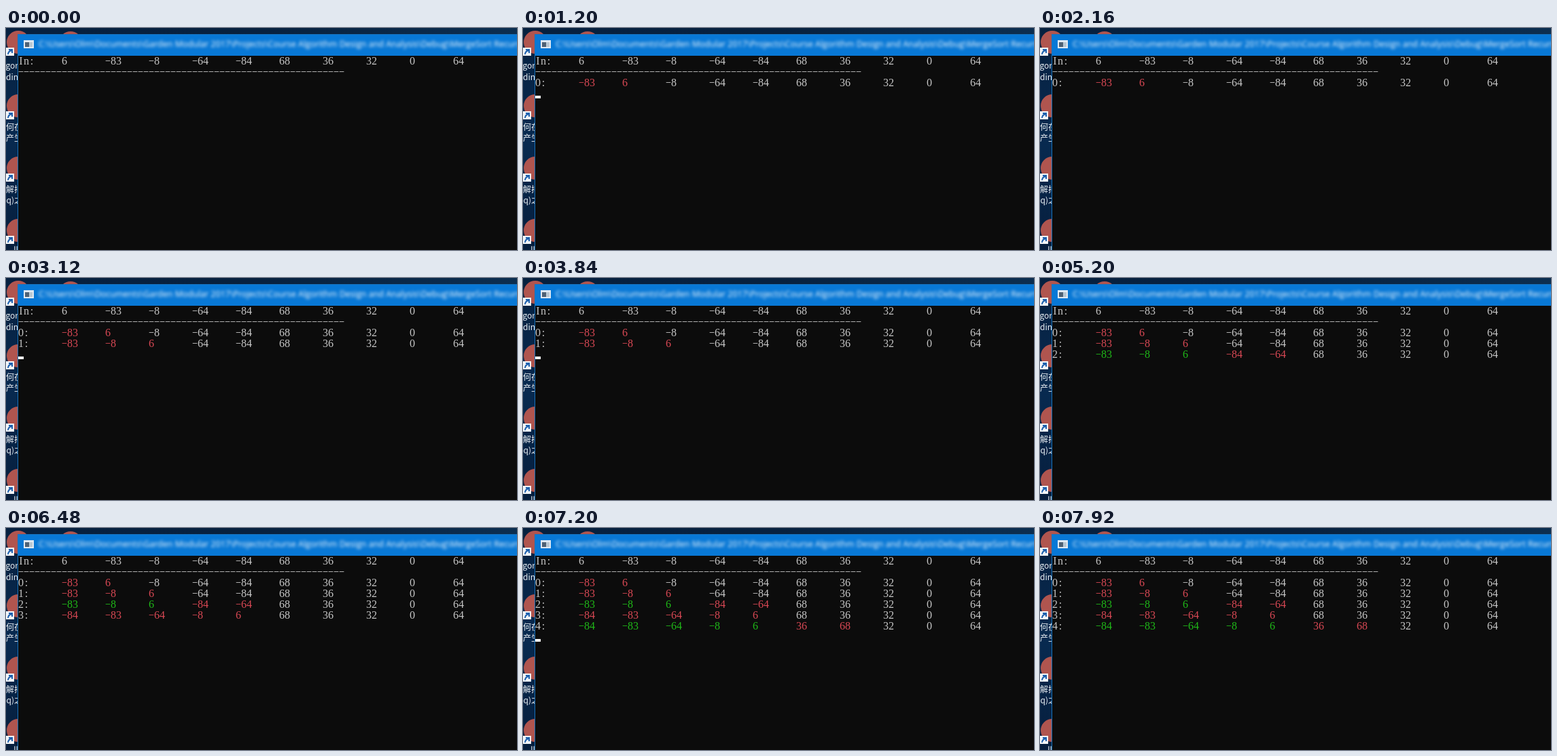
An HTML page with a canvas for the animation above (8000 ms loop, 752 px wide and 328 px high).

```html
<!DOCTYPE html>
<html lang="en">
<head>
<meta charset="utf-8">
<title>Merge sort console</title>
<style>
  html, body { margin: 0; width: 100%; height: 100%; overflow: hidden; background: #0c0c0c; }
  canvas { display: block; }
</style>
</head>
<body>
<canvas id="stage" width="752" height="328"></canvas>
<script>
const ctx = document.getElementById("stage").getContext("2d");
const LOOP = 8000, FIRST = 1150, STEP = 1500, BLINK = 530;
const LEFT = 18, TOP = 41, LINE = 16, CELL = 8, TAB = 64;
const GREY = "#c6c6c6", RED = "#d84854", GREEN = "#1fb818";
const input = [6, -83, -8, -64, -84, 68, 36, 32, 0, 64];

// Each merge sorts the range [lo, hi): red is merged now, green was done before.
const merges = [[0, 2], [0, 3], [3, 5], [0, 5], [5, 7]];
let list = input;
const rows = merges.map(([lo, hi]) => {
  const part = list.slice(lo, hi).sort((a, b) => a - b);
  list = [...list.slice(0, lo), ...part, ...list.slice(hi)];
  return { list, lo, hi };
});

function rect(x, y, w, h, color) {
  ctx.fillStyle = color;
  ctx.fillRect(x, y, w, h);
}

function gradient(x, y, ...colors) {
  const g = ctx.createLinearGradient(0, 0, x, y);
  colors.forEach((c, i) => g.addColorStop(i / (colors.length - 1), c));
  return g;
}

// Fixed-pitch text: one glyph per cell, hyphens as short wide dashes.
function print(text, x, line, color) {
  const base = TOP + line * LINE + 13;
  ctx.fillStyle = color;
  ctx.textAlign = "center";
  [...String(text)].forEach((ch, i) => {
    const dash = ch === "-";
    ctx.font = `${dash ? "bold 13" : "16"}px "Liberation Serif", serif`;
    ctx.fillText(dash ? "–" : ch, x + i * CELL + CELL / 2, base - (dash ? 2.6 : 0));
  });
}

function printRow(label, values, line, colorOf) {
  print(label, LEFT, line, GREY);
  values.forEach((v, i) => print(v, LEFT + TAB * (i + 1), line, colorOf(i)));
}

function icon(x, y) {
  ctx.fillStyle = "#b0554f";
  ctx.beginPath();
  ctx.arc(x, y, 17, 0, 7);
  ctx.fill();
  rect(x - 18, y + 8, 12, 12, "#f2f5f8");
  ctx.strokeStyle = "#1c5fae";
  ctx.lineWidth = 2;
  ctx.stroke(new Path2D(`M${x - 15} ${y + 18}q0 -5 6 -6m-5 -1h5v5`));
}

function desktop() {
  rect(0, 0, 752, 328, gradient(0, 328, "#06203f", "#082a50", "#061e3d"));
  rect(18, 0, 734, 9, gradient(752, 0, "#06203f", "#07213f", "#0c2e50"));
  [21, 115, 207, 299].forEach(y => icon(18, y));
  icon(95, 22);
  ctx.font = '12px "Noto Sans CJK SC", "Noto Sans", sans-serif';
  ctx.textAlign = "right";
  ctx.fillStyle = "#eef2f6";
  [["gor", 60], ["ndin", 77], ["何在", 151], ["产生", 167],
   ["解排", 243], ["q)之", 259], ["ll", 332]]
    .forEach(([text, y]) => ctx.fillText(text, /[^a-z]/.test(text) ? 24 : 18, y));
}

function titleBar() {
  rect(17, 9, 735, 319, "#1873bd");
  rect(18, 10, 734, 31, "#0878d6");
  rect(26, 18, 15, 12, "#dfe9f2");
  rect(28, 21, 6, 7, "#4f6274");
  rect(34, 21, 5, 7, "#b9c7d2");
  ctx.save();
  ctx.filter = "blur(2px)";
  ctx.font = '12.5px "Open Sans", sans-serif';
  ctx.textAlign = "left";
  ctx.fillStyle = "#ffffff";
  ctx.fillText("C:\\Users\\Olm\\Documents\\Garden Modular 2017\\Projects\\Course " +
    "Algorithm Design and Analysis\\Debug\\MergeSort Recursive.exe", 48, 28);
  ctx.restore();
}

function draw(t) {
  rect(LEFT, TOP, 734, 287, "#0c0c0c");
  printRow("In:", input, 0, () => GREY);
  print("-".repeat(60), LEFT, 1, GREY);

  const shown = t < FIRST ? 0 : Math.min(rows.length, Math.floor((t - FIRST) / STEP) + 1);
  rows.slice(0, shown).forEach((r, n) =>
    printRow(n + ":", r.list, n + 2, i => i < r.lo ? GREEN : i < r.hi ? RED : GREY));

  // The cursor restarts its blink whenever a row is written.
  const since = shown ? t - FIRST - (shown - 1) * STEP : t + 600;
  if (since % (2 * BLINK) < BLINK) rect(LEFT, TOP + (shown + 2) * LINE + 11, CELL, 4, "#ffffff");
}

desktop();
titleBar();
let start;
function tick(now) {
  start ??= now;
  draw((now - start) % LOOP);
  requestAnimationFrame(tick);
}
draw(0);
requestAnimationFrame(tick);
</script>
</body>
</html>
```
